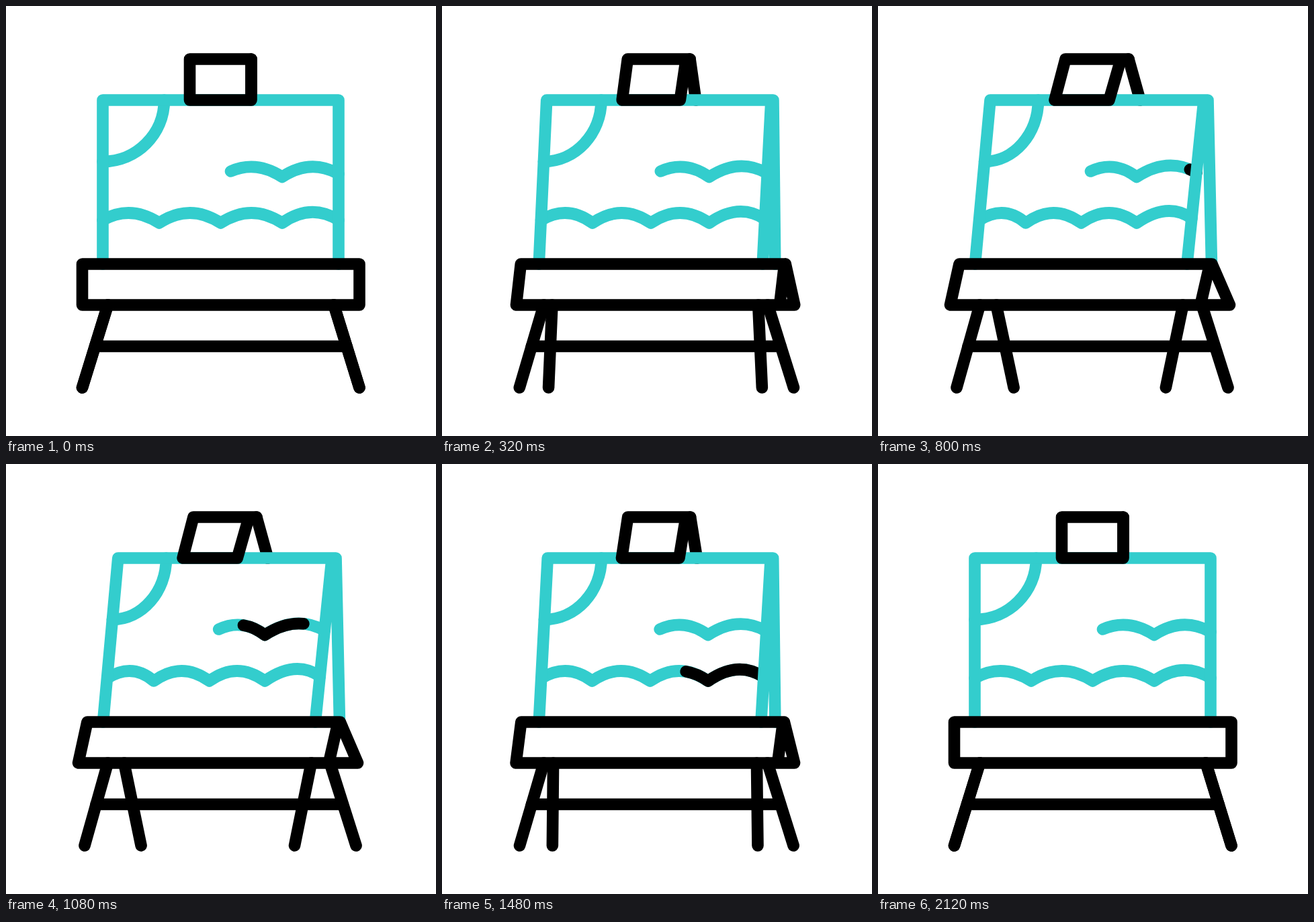
These frames come from a looping animation (640x640 px, 2360 ms). An HTML page:

```html
<!DOCTYPE html>
<html lang="en">
<head>
<meta charset="utf-8">
<title>Easel</title>
<style>
  html, body { margin: 0; width: 100%; height: 100%; overflow: hidden; background: #fff; }
  svg { display: block; width: 100vw; height: 100vh; }
  path { fill: none; stroke: #000; stroke-width: 17.6; stroke-linecap: round; stroke-linejoin: round; }
  .teal { stroke: #33cdcd; }
</style>
</head>
<body>
<svg viewBox="0 0 640 640"></svg>
<script>
const LOOP = 2360, STEP = 40;
const svg = document.querySelector('svg');

// "a>b" is a coordinate that goes from a (closed easel) to b (open easel).
const birds = 'M495>474 250>248Q453.1>431 226.5>224 411>385 254.5Q372.8>352 229.5 334.5>316.5 246';
const waves = 'M495>467 318.6>316Q453.1>431 293>291 411>385 323Q365.2>343.7 293 319.5>302.5 323' +
  'Q273.7>261.2 293 228>220 323Q185.9>188 295.4 144>151 318.6';

const shapes = [];
function add(d, cls = '') {
  const el = document.createElementNS('http://www.w3.org/2000/svg', 'path');
  el.setAttribute('class', cls);
  svg.append(el);
  shapes.push({ el, d });
  return el;
}

function addStroke(d, head, tail) {
  const el = add(d);
  el.setAttribute('pathLength', 1);
  return { el, head, tail };
}

add('M365>373 79L365>390 140');                                   // rear of the clip
add('M235.5>238.5 140C235.5>238.5 190.5 194.5>202 231.5 144>158.5 231.5', 'teal');
add(birds, 'teal');
add(waves, 'teal');
const strokes = [
  addStroke(birds, [720, 1240], [920, 1480]),
  addStroke(waves, [1240, 1840], [1480, 2120])
];
add('M144>144.5 384L144>167 140L495>491 140L495>496.5 384M495>485 140L495>460 384', 'teal');
add('M365>373 79L273.5>279 79L273.5>263 140L365>344 140L365>361.5 79');
add('M526>497 384L113.5>121 384L113.5>107.5 445L526>523.5 445L526>497 384M526>494 384L526>480 445');
add('M151.5 445L113.5>117 568M488>482 445L526>521 568');          // rear legs
add('M151.5>176 445L113.5>202 568M488>454 445L526>428.5 568');    // front legs
add('M132.5>134 506.5L507>501 506.5');

const clamp = x => Math.min(1, Math.max(0, x));
const smooth = x => x * x * (3 - 2 * x);
const ramp = (t, [from, to]) => smooth(clamp((t - from) / (to - from)));

// Cubic Bezier easing (.4, 0, .2, 1), solved by bisection.
function ease(x) {
  let lo = 0, hi = 1;
  for (let i = 0; i < 24; i++) {
    const s = (lo + hi) / 2, r = 1 - s;
    if (1.2 * s * r * r + 0.6 * s * s * r + s * s * s < x) lo = s; else hi = s;
  }
  return smooth(lo);
}

function draw(t) {
  const open = 1.01 * ease(clamp(Math.min(t, 1825 - t) / 910));
  for (const { el, d } of shapes) {
    el.setAttribute('d', d.replace(/([\d.]+)>([\d.]+)/g,
      (_, a, b) => (+a + (b - a) * open).toFixed(2)));
  }
  for (const { el, head, tail } of strokes) {
    const end = ramp(t, head), start = ramp(t, tail);
    el.style.display = end - start > 0.001 ? '' : 'none';
    el.setAttribute('stroke-dasharray', `${end - start} 9`);
    el.setAttribute('stroke-dashoffset', -start);
  }
}

const begin = performance.now();
function tick() {
  const t = (performance.now() - begin) % LOOP;
  draw(Math.floor(t / STEP) * STEP);
  requestAnimationFrame(tick);
}
tick();
</script>
</body>
</html>
```
